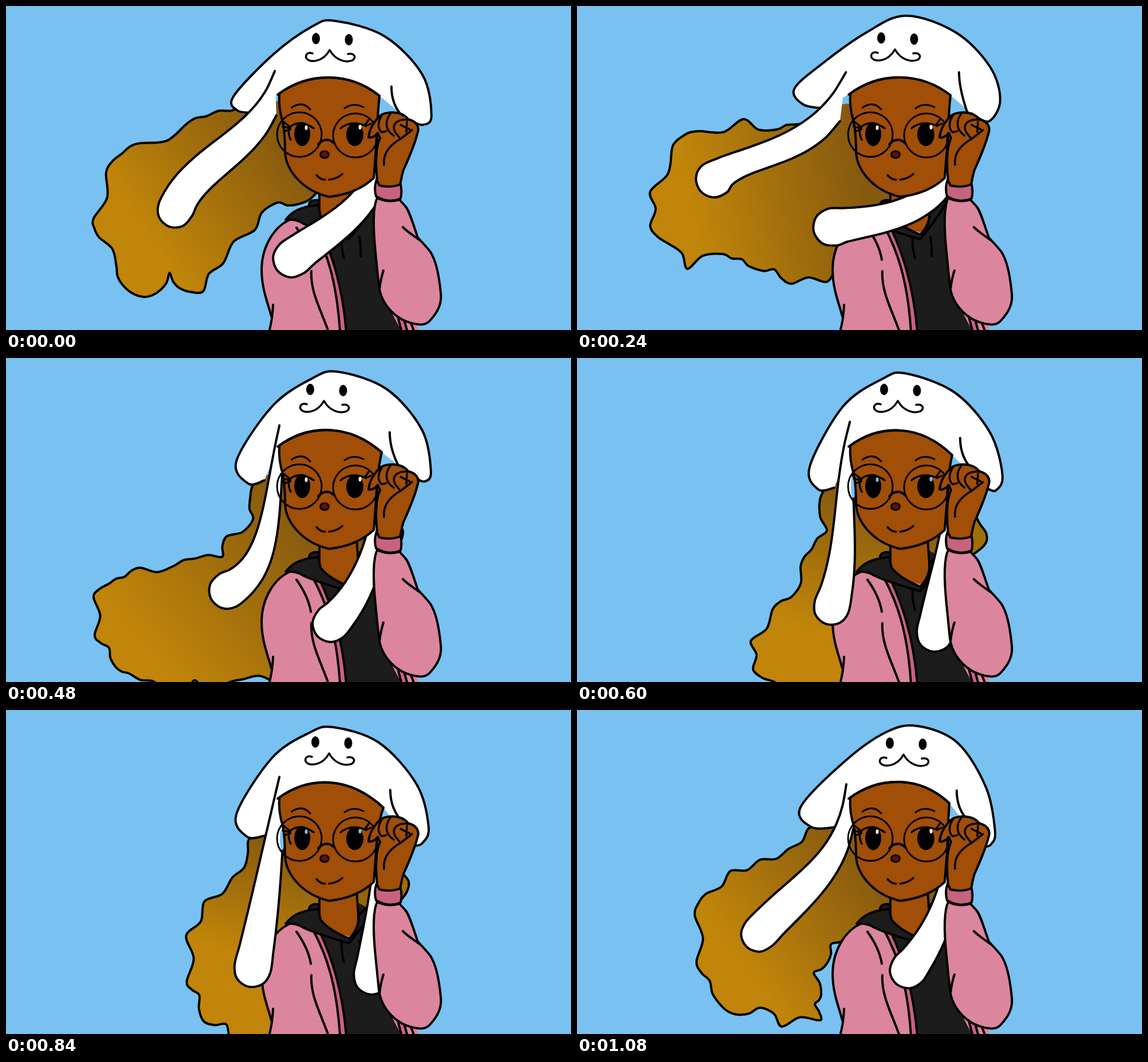
Write an HTML page with a canvas that moves like this. It is 988 by 567 pixels and loops after 1200 ms.

```html
<!DOCTYPE html>
<html lang="en">
<head>
<meta charset="utf-8">
<title>Bunny hat in the wind</title>
<style>
html, body { margin: 0; height: 100%; overflow: hidden; background: #79c1f0; }
canvas { display: block; }
</style>
</head>
<body>
<canvas id="stage" width="988" height="567"></canvas>
<script>
const ctx = document.getElementById('stage').getContext('2d');
const SKY = '#79c1f0', SKIN = '#a04e08', PINK = '#dc859f', ROSE = '#c9627f', COAL = '#1c1c1c', WHITE = '#fff';
const STEP = 120, COUNT = 10;
const BRIM = [475, 155], ROOT = [662, 170, 16];

const parse = s => s.trim().split(/\s+/).map(p => p.split(',').map(Number));
const lerp = (a, b, t) => a.map((v, k) => v + (b[k] - v) * t);

// Rounded lobes over short gaps, a dent in each long one
function scallop(keys) {
  return keys.flatMap((a, i) => {
    const b = keys[i + 1];
    if (!b) return [a];
    const dx = b[0] - a[0], dy = b[1] - a[1], dent = Math.hypot(dx, dy) > 50 ? 0.16 : -0.1;
    return [a, [(a[0] + b[0]) / 2 + dy * dent, (a[1] + b[1]) / 2 - dx * dent]];
  });
}

// Poses hold key points: hair lobes, hat contour, ear spines (x, y, radius) and single anchors
const poses = [];
function pose(i, parts) {
  const p = poses[i] = { bump: [[660, 290]] };
  for (const key in parts) p[key] = parse(parts[key]);
  p.hair = scallop(p.hair);
  p.right.unshift(ROOT);
}

pose(0, {
  hair: `440,170 395,183 350,193 316,206 235,240 203,258 175,292 153,372 163,405 193,455 203,487 240,509 270,497
    286,467 304,494 345,499 380,450 435,392 475,344 510,347 545,325`,
  hat: '437,187 405,183 398,158 467,85 535,36 575,26 662,53 728,120 744,192 728,208 702,198',
  left: '478,115,8 460,245,34 330,265,28 296,357,31',
  right: '690,345,20 560,390,28 500,442,33',
  fold: '674,141', brim: '653,157', tip: '250,400', face: '542,57'
});
pose(2, {
  hair: `440,175 385,207 350,216 291,198 215,219 180,231 166,250 128,325 128,385 160,416 193,460 255,434 288,443
    312,460 345,461 375,486 435,483 455,450`,
  hat: '428,179 395,172 380,145 430,100 505,47 575,17 662,46 722,106 740,165 720,202 690,188',
  left: '478,118,8 440,265,40 294,252,8 240,303,32',
  right: '690,380,26 514,372,20 446,387,33',
  fold: '668,116', brim: '653,156', tip: '190,290', face: '532,56'
});
pose(3, {
  hair: `450,190 428,230 406,262 350,271 298,268 268,241 246,259 215,261 185,270 164,295 142,340 160,366 186,380
    183,404 230,460 262,500 278,523 335,553 388,549 402,532 425,531 447,510 455,485`,
  hat: '452,191 412,193 398,165 470,76 540,29 580,21 660,48 720,118 735,190 718,210 700,200',
  left: '471,122,8 470,270,22 395,330,18 334,365,31',
  right: '680,335,20 593,402,26 519,458,32',
  fold: '668,128', brim: '653,160', tip: '170,330', face: '528,55'
});
pose(4, {
  hair: `440,210 427,245 432,282 386,312 378,348 330,351 293,364 235,367 207,383 180,395 153,418 155,485 180,507
    192,541 215,552 258,566 300,590 330,564 370,590 415,562 470,568`,
  hat: '452,214 424,220 403,180 466,84 535,36 580,24 665,54 727,125 743,198 732,216 712,208',
  left: '484,119,6 460,260,14 470,365,20 387,407,32',
  right: '665,315,16 626,412,24 568,465,32',
  fold: '671,130', brim: '657,165', tip: '210,460', face: '532,55', bump: '694,302'
});
pose(5, {
  hair: `440,222 424,255 437,302 410,335 391,365 375,418 342,440 304,495 308,545 345,567 370,590 500,590`,
  hat: '450,227 422,230 407,190 465,85 535,36 575,27 660,60 722,130 744,205 732,232 714,226',
  left: '483,113,6 457,235,14 480,330,20 445,436,31',
  right: '668,290,16 636,386,24 626,482,32',
  fold: '670,140', brim: '656,170', tip: '400,470', face: '537,55', bump: '716,308'
});
pose(7, {
  hair: `430,215 423,250 396,293 347,335 315,395 316,475 338,499 346,545 385,550 405,590 500,590`,
  hat: '452,220 422,222 403,182 465,84 530,40 572,30 652,57 718,130 739,205 728,233 712,238',
  left: '484,118,6 465,250,18 455,335,26 431,453,32',
  right: '665,280,16 650,376,24 640,466,32',
  fold: '672,140', brim: '660,171', tip: '425,430', face: '541,56', bump: '704,300'
});
pose(9, {
  hair: `450,203 405,207 370,243 320,262 268,282 225,322 206,360 209,440 232,474 250,515 280,533 320,521 358,554
    425,543 416,515 427,498 414,460 438,442 444,410 475,395`,
  hat: '452,205 410,205 391,170 468,90 540,39 595,28 665,57 715,135 731,212 724,235 712,240',
  left: '478,130,7 478,270,22 392,310,32 318,392,31',
  right: '670,305,16 631,393,24 579,455,32',
  fold: '664,141', brim: '651,163', tip: '260,400', face: '547,58'
});

// Point at fraction t along a list, counted in points
function along(list, t) {
  const x = t * (list.length - 1), i = Math.floor(x);
  return lerp(list[i], list[i + 1] || list[i], x - i);
}

function halfway(a, b) {
  const mid = {};
  for (const key in a) {
    const n = Math.max(a[key].length, b[key].length);
    mid[key] = Array.from({ length: n }, (_, i) => {
      const t = i / (n - 1 || 1);
      return lerp(along(a[key], t), along(b[key], t), 0.5);
    });
  }
  return mid;
}
for (const i of [1, 6, 8]) poses[i] = halfway(poses[i - 1], poses[i + 1]);

// Smooth curve through points, then straight on to the tail
function spline(pts, tail = []) {
  const path = new Path2D(), at = i => pts[Math.max(0, Math.min(pts.length - 1, i))];
  path.moveTo(pts[0][0], pts[0][1]);
  for (let i = 0; i < pts.length - 1; i++) {
    const [a, b, c, d] = [at(i - 1), at(i), at(i + 1), at(i + 2)];
    path.bezierCurveTo(b[0] + (c[0] - a[0]) / 6, b[1] + (c[1] - a[1]) / 6,
      c[0] - (d[0] - b[0]) / 6, c[1] - (d[1] - b[1]) / 6, c[0], c[1]);
  }
  tail.forEach(p => path.lineTo(...p));
  return path;
}

function bezier(pts, t) {
  while (pts.length > 1) pts = pts.slice(1).map((p, i) => lerp(pts[i], p, t));
  return pts[0];
}

// Round-tipped ear: down one side of the spine, around the tip and back up
function ear(spine) {
  const pts = [], add = (t, turn) => {
    const [x, y, r] = bezier(spine, t), [u, v] = bezier(spine, t - 0.01), [p, q] = bezier(spine, t + 0.01);
    const angle = Math.atan2(q - v, p - u) + turn;
    pts.push([x + r * Math.cos(angle), y + r * Math.sin(angle)]);
  };
  for (let t = 0; t < 0.99; t += 0.1) add(t, Math.PI / 2);
  for (let k = 2; k >= -2; k--) add(1, k * Math.PI / 4);
  for (let t = 0.9; t > 0.15; t -= 0.1) add(t, -Math.PI / 2);
  return spline(pts);
}

function draw(shape, fill, width = 4) {
  const path = typeof shape === 'string' ? new Path2D(shape) : shape;
  if (fill) { ctx.fillStyle = fill; ctx.fill(path); }
  if (width) { ctx.lineWidth = width; ctx.stroke(path); }
}

function oval(x, y, rx, ry, fill, width = 0) {
  const path = new Path2D();
  path.ellipse(x, y, rx, ry, 0, 0, 7);
  draw(path, fill, width);
}

function drawHair(p) {
  const shade = ctx.createLinearGradient(490, 230, ...p.tip[0]), [x, y] = p.bump[0];
  shade.addColorStop(0, '#85590f');
  shade.addColorStop(1, '#c0850a');
  draw(spline(p.hair, [[640, 345], [640, 150]]), shade, 0);
  draw(spline(p.hair));
  draw(spline([[680, y - 70], [x - 14, y - 22], [x, y], [x - 4, y + 20], [680, y + 45]]), '#a06e0c');
}

function drawBody() {
  draw('M530,352C528,340 540,338 550,341L550,365Z', COAL);
  draw('M612,335L630,345L650,325V400H600Z', COAL, 0);
  draw('M548,325V366C560,382 580,392 600,400C612,388 618,375 616,358L613,315Z', SKIN);
  draw('M497,374C470,385 447,420 447,462C447,495 458,520 464,543L459,570H720V480L640,400L540,388Z', PINK, 0);
  draw('M497,374C470,385 447,420 447,462C447,495 458,520 464,543M467,523Q466,548 460,570');
  draw('M540,387L598,406L650,335V490L692,570H595C588,485 568,430 549,389Z', COAL, 0);
  draw('M538,387C558,425 578,475 584,570H595C588,485 568,430 549,389Z', ROSE);
  draw('M489,374C500,360 512,352 546,348L550,367C562,382 580,392 600,400C614,388 618,375 616,360'
    + 'L632,344L648,340C635,365 615,390 600,408C575,401 540,390 520,381Q508,372 489,374Z', COAL);
  draw('M684,540L692,570H702L695,545Z', ROSE);
  draw('M706,550L714,570');
  draw('M508,388C520,405 530,425 533,444M534,464C532,500 550,530 564,570'
    + 'M587,405C586,420 588,430 591,441M618,404Q621,420 620,438');
}

function drawHat(p) {
  const [fx, fy] = p.fold[0];
  draw(spline(p.hat, [p.brim[0], BRIM]), WHITE, 0);
  draw(spline(p.hat));
  draw(ear(p.right), WHITE);
  draw(ear(p.left), WHITE);
  draw(`M${fx},${fy}Q${fx},${fy + 28} ${fx + 15},188`);
  ctx.save();
  ctx.translate(...p.face[0]);
  oval(0, 0, 7, 10, '#000');
  oval(57.5, 2, 7, 10, '#000');
  draw('M-6,26C-14,23 -19,28 -17,34C-12,43 12,42 24,20C34,38 52,43 64,38C72,32 66,25 56,27', null, 3.5);
  ctx.restore();
}

function drawFace(p, gap) {
  const [bx, by] = p.brim[0], arc = `C530,115 600,115 ${bx},${by}`;
  if (gap) oval(483, 226, 4, 19, SKY);
  draw(`M478,153${arc}Q649,200 647,250L643,301
    C625,318 600,330 565,334C515,322 489,285 488,255Q488,225 484,203Q476,178 478,153Z`, SKIN);
  draw(`M${BRIM}${arc}`);
  draw('M499,178Q518,165 532,181M592,179Q607,168 625,177', null, 3);
  oval(518, 224, 14, 21, '#000');
  oval(610, 225, 15, 20, '#000');
  draw('M496,212Q514,197 538,214M585,214Q604,199 630,210M486,203L497,212M484,211L497,214M488,219L497,216'
    + 'M628,208L635,198M629,210L638,206M495,214Q493,226 498,234', null, 3.5);
  oval(525, 213, 2.5, 4, gap ? SKY : WHITE);
  oval(619, 212, 2.5, 4, gap ? SKY : WHITE);
  oval(557, 260, 7.5, 6, '#5c1407', 3);
  draw('M543,296Q550,304 558,304M565,304Q580,302 588,294', null, 3.5);
  oval(513, 225, 39, 39, null, 3);
  oval(611, 226.5, 39, 38.5, null, 3);
  draw('M546,242Q560,227 575,241');
}

function drawArm() {
  draw('M634,230C636,214 643,204 652,194C662,183 692,183 703,198C714,201 721,207 721,217C716,240 705,265 695,287'
    + 'C691,300 691,306 688,318L650,315C645,275 647,245 654,231L650,222C645,229 640,231 634,230Z', SKIN);
  draw('M661,278C658,254 677,240 692,231L710,217M658,190C648,206 651,216 657,221M673,187C660,204 665,218 678,227'
    + 'M704,199C684,197 674,207 680,220L690,233M690,208L706,216M701,203L700,220M657,221L665,219', null, 3.5);
  draw('M648,304L653,314Q672,319 690,312Q693,325 690,337Q668,346 647,333Q643,318 648,304Z', ROSE);
  draw('M649,336C640,355 643,400 646,430L652,490C656,520 680,552 720,557Q732,559 740,552C756,535 763,520 760,500'
    + 'C757,470 752,445 742,430C735,421 727,413 720,405C712,382 705,357 698,350L688,339Q668,345 649,336Z', PINK);
  draw('M660,463Q655,478 653,497M694,387C705,398 715,403 725,411');
}

function frame() {
  const i = Math.floor(performance.now() / STEP) % COUNT, p = poses[i];
  ctx.fillStyle = SKY;
  ctx.fillRect(0, 0, 988, 567);
  drawHair(p);
  drawBody();
  drawHat(p);
  drawFace(p, i >= 5 && i <= 7);
  drawArm();
  requestAnimationFrame(frame);
}

ctx.lineCap = ctx.lineJoin = 'round';
frame();
</script>
</body>
</html>
```
